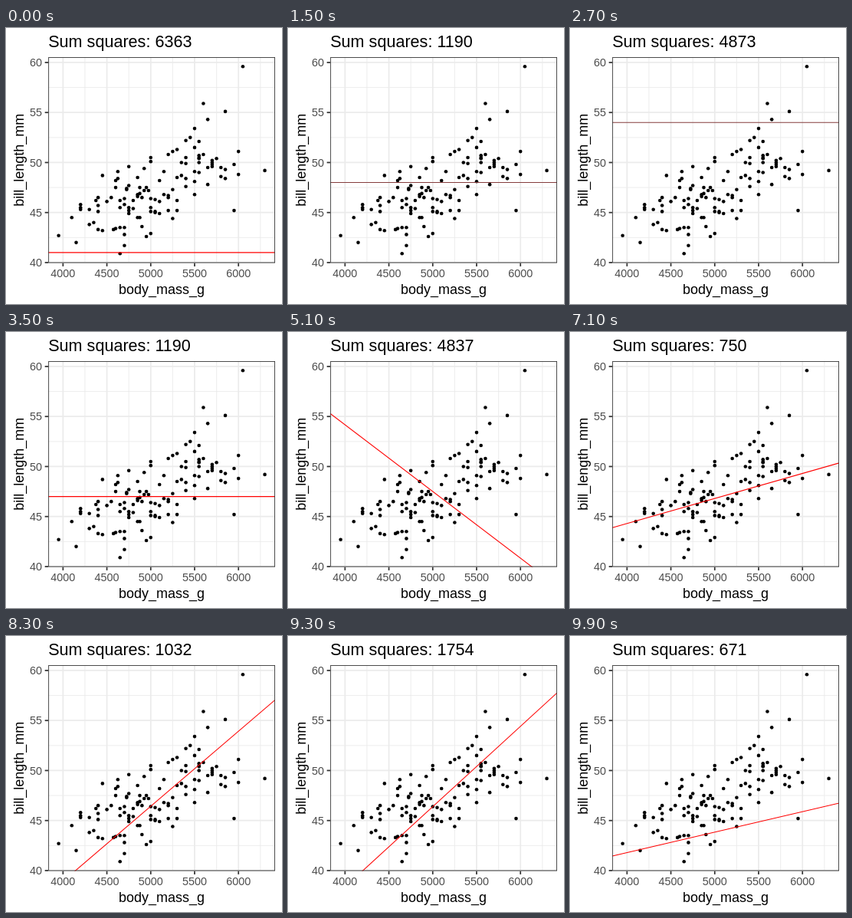
An HTML page with a canvas for the animation above (10000 ms loop, 360x360 px).

```html
<!DOCTYPE html>
<html lang="en">
<head>
<meta charset="utf-8">
<title>Sum of squares</title>
<style>
  html, body { margin: 0; width: 100%; height: 100%; overflow: hidden; background: #fff; }
  canvas { display: block; }
</style>
</head>
<body>
<canvas width="360" height="360"></canvas>
<script>
const ctx = document.querySelector('canvas').getContext('2d');
const L = 55.2, R = 351, T = 38, B = 306.4;
const xMin = 3832.5, xMax = 6417.5, yMin = 39.965, yMax = 60.535;
const px = x => L + (x - xMin) / (xMax - xMin) * (R - L);
const py = y => B - (y - yMin) / (yMax - yMin) * (B - T);

// Bill lengths for each body mass, from 3950 g in steps of 50 g
const rows = [
  [42.7], [], [], [44.5], [42], [45.8, 45.5, 45.3], [], [45.3, 43.8], [44],
  [43.3, 46.5, 45.1, 45.7], [48.7, 43.2], [46.1], [46.5], [48.2, 47.5, 43.4],
  [40.9, 45.5, 46.2, 43.5], [42.8, 45.8, 43.5, 46.4, 41.7],
  [49.6, 47.7, 45.2, 44.9, 45.5], [45.4, 46.2], [46.6, 44.5, 48.5, 46.8],
  [43.6, 46.5], [42.6, 47.5], [45.1, 42.9, 50.1, 45.5, 46.4, 50.5],
  [46.3, 45.1, 45], [46.1, 44.9, 48.2], [46.8, 49.1], [46.7, 46.5, 50.8, 45.2],
  [47.3, 44.4, 51.1], [45.2, 48.5, 46.2, 51.3], [48.7, 50],
  [47.6, 48.4, 50.5, 52.2, 49.9], [52.5], [49.1, 46.8, 53.4, 48.1, 51.5],
  [49, 50, 50.5, 50.4, 50.7, 52.1], [50.8, 55.9], [47.8, 54.3, 49.5],
  [50, 50.2, 49.6, 49.8], [50.4], [49.5, 48.6], [48.4, 49.3, 55.1], [],
  [45.2, 49.8], [51.1, 48.8], [59.6], [], [], [], [], [49.2]
];
const between = {
  4375: [46.2], 4575: [43.3], 4625: [49.1, 48.4], 4725: [47.4, 47.3],
  4875: [47.5, 46.9, 44.5], 4925: [49.4, 47.2], 4975: [47.2]
};

// Each fit: height at the mean mass, and slope
const meanMass = 5076.016;
const fits = [41, 44, 47, 50, 53, 56, 47].map(mid => ({ mid, slope: 0 }));
for (let i = -4; i <= 4; i++) fits.push({ mid: 47, slope: i * 0.0025 });
fits.push({ mid: 47, slope: 0.00409 });

const sumSquares = ({ mid, slope }) => Math.round(
  1158.737 + 123 * (mid - 47.504878) ** 2 - 2 * slope * 126834.6 + slope ** 2 * 31004246);

function stroke(x1, y1, x2, y2, width, color) {
  ctx.lineWidth = width;
  ctx.strokeStyle = color;
  ctx.beginPath();
  ctx.moveTo(x1, y1);
  ctx.lineTo(x2, y2);
  ctx.stroke();
}

function text(str, x, y, size, align, color = '#000') {
  ctx.font = size + 'px "Liberation Sans", Arial, sans-serif';
  ctx.textAlign = align;
  ctx.fillStyle = color;
  ctx.fillText(str, x, y);
}

function dots(mass, bills) {
  for (const bill of bills) {
    ctx.beginPath();
    ctx.arc(px(mass), py(bill), 2.3, 0, 7);
    ctx.fill();
  }
}

function grid(xStart, yStart, width) {
  for (let x = xStart; x < xMax; x += 500) stroke(px(x), T, px(x), B, width, '#ebebeb');
  for (let y = yStart; y < yMax; y += 5) stroke(L, py(y), R, py(y), width, '#ebebeb');
}

function axes() {
  for (let x = 4000; x <= 6000; x += 500) {
    stroke(px(x), B, px(x), B + 4.5, 1.75, '#333');
    text(x, px(x), 325, 14.4, 'center', '#4d4d4d');
  }
  for (let y = 40; y <= 60; y += 5) {
    stroke(L - 4.5, py(y), L, py(y), 1.75, '#333');
    text(y, L - 8.1, py(y) + 5.2, 14.4, 'right', '#4d4d4d');
  }
  text('body_mass_g', (L + R) / 2, 347, 18, 'center');
  ctx.save();
  ctx.translate(22.7, (T + B) / 2);
  ctx.rotate(-Math.PI / 2);
  text('bill_length_mm', 0, 0, 18, 'center');
  ctx.restore();
}

function draw(now) {
  // Ten steps a second; each fit rests for three, then moves for three
  const step = Math.floor(now / 100) % 100;
  const i = Math.floor(step / 6);
  const from = fits[i], to = fits[(i + 1) % fits.length];
  const moves = i === fits.length - 1 ? 2 : 3;
  const p = Math.max(0, step % 6 - 2) / moves;
  const mid = from.mid + (to.mid - from.mid) * p;
  const slope = from.slope + (to.slope - from.slope) * p;
  const fitY = x => py(mid + slope * (x - meanMass));
  const sliding = p > 0 && p < 1 && !from.slope && !to.slope;

  ctx.fillStyle = '#fff';
  ctx.fillRect(0, 0, 360, 360);
  axes();
  text('Sum squares: ' + sumSquares(p > 0.5 ? to : from), L, 25, 21.6, 'left');

  ctx.save();
  ctx.beginPath();
  ctx.rect(L, T, R - L, B - T);
  ctx.clip();
  grid(4250, 42.5, 0.87);
  grid(4000, 40, 1.75);
  ctx.fillStyle = '#000';
  rows.forEach((bills, n) => dots(3950 + 50 * n, bills));
  for (const mass in between) dots(+mass, between[mass]);
  stroke(L, fitY(xMin), R, fitY(xMax), 1.07, sliding ? '#843c3c' : '#f00');
  ctx.lineWidth = 1.75;
  ctx.strokeStyle = '#333';
  ctx.strokeRect(L, T, R - L, B - T);
  ctx.restore();
}

const start = performance.now();
function tick() {
  draw(performance.now() - start);
  requestAnimationFrame(tick);
}
tick();
</script>
</body>
</html>
```
